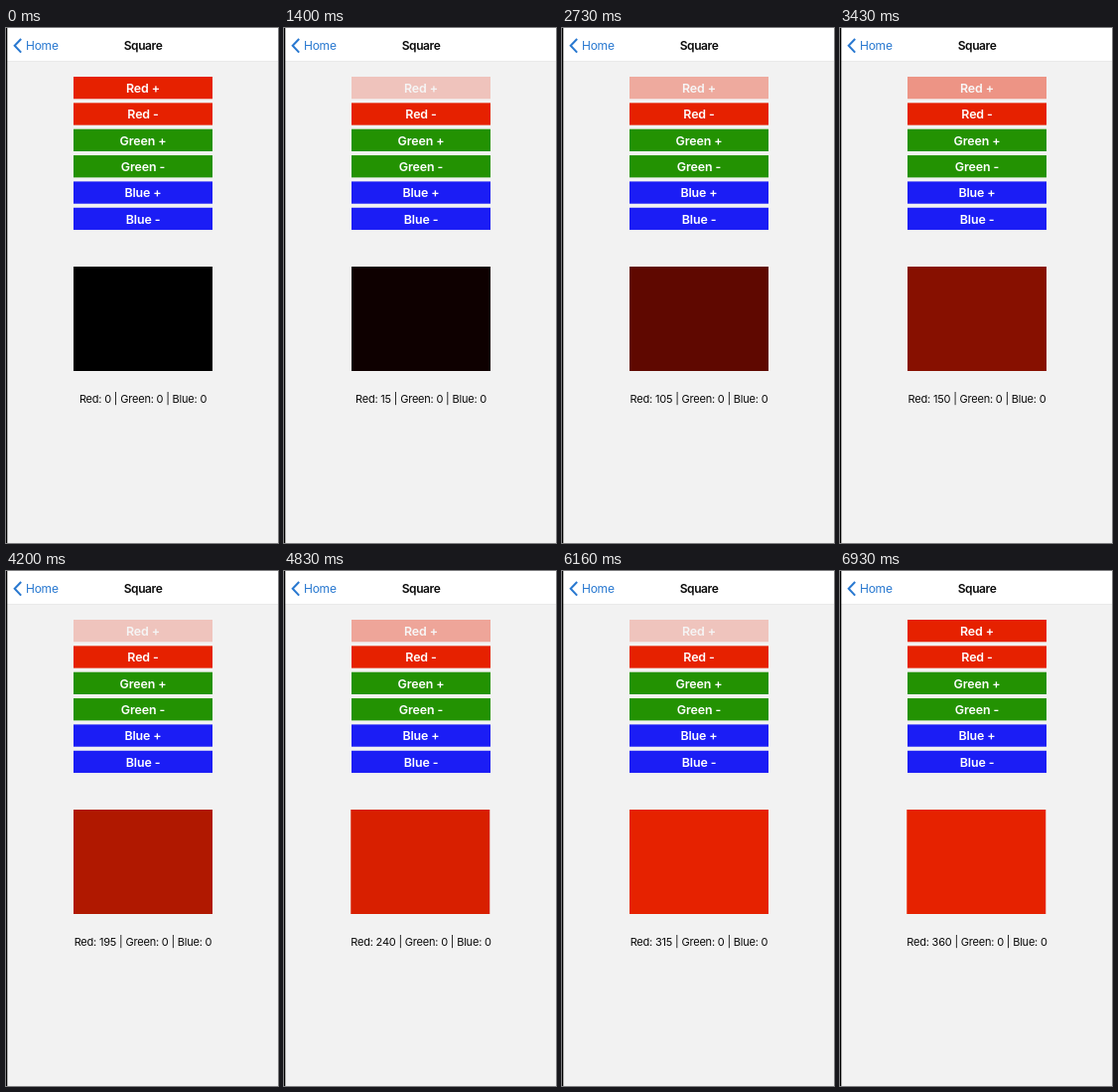
Recreate the animation shown at these times as an HTML page with a canvas. Size 274x518 px, loop 8000 ms.

```html
<!DOCTYPE html>
<html lang="en">
<head>
<meta charset="utf-8">
<title>Square</title>
<style>
  html, body { margin: 0; width: 100%; height: 100%; overflow: hidden; background: #f2f2f2; }
  canvas { display: block; }
</style>
</head>
<body>
<canvas id="stage" width="274" height="518"></canvas>
<script>
const ctx = document.getElementById('stage').getContext('2d');
const LOOP = 8000;
const FONT = 'Inter, "Open Sans", sans-serif';
const CENTER = 138;
const BG = [242, 242, 242];
const WHITE = [255, 255, 255];
const RED = [230, 33, 0];
const GREEN = [35, 146, 2];
const BLUE = [27, 29, 245];

const BUTTONS = [
  ['Red +', RED], ['Red -', RED],
  ['Green +', GREEN], ['Green -', GREEN],
  ['Blue +', BLUE], ['Blue -', BLUE]
];

// Tap rhythm as [tap number, release time]; taps between are evenly spaced.
const RHYTHM = [
  [1, 1390], [4, 2090], [7, 2660], [8, 2890], [9, 3100], [10, 3335],
  [13, 4060], [14, 4290], [19, 5450], [21, 5990], [24, 6650]
];
const FIRST_PRESS = 1170;
const PRESS_LEAD = 100;
const FADE_IN = 150;
const FADE_OUT = 250;
const DIM = 0.22;
const STEP = 15;

const releases = [];
RHYTHM.forEach(([n, time], i) => {
  if (i) {
    const [prevN, prevTime] = RHYTHM[i - 1];
    for (let k = prevN + 1; k < n; k++) {
      releases.push(prevTime + (time - prevTime) * (k - prevN) / (n - prevN));
    }
  }
  releases.push(time);
});

const clamp01 = v => Math.min(1, Math.max(0, v));
const ease = u => u < 0.5 ? 2 * u * u : 1 - 2 * (1 - u) * (1 - u);
const mix = (a, b, k) => a.map((v, i) => v + (b[i] - v) * k);
const rgb = c => `rgb(${c.map(Math.round).join(',')})`;

function buttonOpacity(t, taps) {
  if (!taps) return 1 - (1 - DIM) * ease(clamp01((t - FIRST_PRESS) / FADE_IN));
  if (taps < releases.length && t >= releases[taps] - PRESS_LEAD) return DIM;
  return DIM + (1 - DIM) * ease(clamp01((t - releases[taps - 1]) / FADE_OUT));
}

function setFont(size, weight, spacing) {
  ctx.font = `${weight} ${size}px ${FONT}`;
  ctx.letterSpacing = spacing + 'px';
}

function text(str, x, y, color, align = 'center') {
  ctx.textAlign = align;
  ctx.fillStyle = color;
  ctx.fillText(str, x, y);
}

function rect(x, y, w, h, color) {
  ctx.fillStyle = color;
  ctx.fillRect(x, y, w, h);
}

function drawHeader() {
  rect(0, 0, 274, 33, '#fff');
  rect(0, 33, 274, 0.5, '#dedede');
  ctx.strokeStyle = '#2878d0';
  ctx.lineWidth = 2;
  ctx.beginPath();
  ctx.moveTo(15.2, 11);
  ctx.lineTo(8.7, 17.8);
  ctx.lineTo(15.2, 24.6);
  ctx.stroke();
  setFont(12, 400, -0.25);
  text('Home', 20, 22, '#2878d0', 'left');
  setFont(12, 600, -0.4);
  text('Square', CENTER, 22, '#0a0a0a');
}

function drawButton([name, color], i, opacity) {
  const y = 49 + i * 26.35;
  rect(68, y, 140, 22.3, rgb(mix(BG, color, opacity)));
  setFont(12.4, 600, -0.1);
  text(name, CENTER, y + 15.8, rgb(mix(BG, WHITE, opacity)));
}

function squareColor(red) {
  const level = Math.min(red, 255) / 255;
  return rgb([230 * level, Math.max(0, 44 * level - 10), 0]);
}

function draw(t) {
  const taps = releases.filter(r => r <= t).length;
  const red = taps * STEP;
  rect(0, 0, 274, 518, rgb(BG));
  drawHeader();
  BUTTONS.forEach((b, i) => drawButton(b, i, i ? 1 : buttonOpacity(t, taps)));

  // The square shares its left edge with the caption once that is wider.
  const caption = `Red: ${red} | Green: 0 | Blue: 0`;
  setFont(11, 400, -0.2);
  const left = Math.min(68, CENTER - ctx.measureText(caption).width / 2);
  rect(left, 240, 140, 105, squareColor(red));
  text(caption, CENTER, 376.7, '#0a0a0a');

  rect(0, 0, 1.3, 518, '#000');
}

function tick(now) {
  draw(now % LOOP);
  requestAnimationFrame(tick);
}
draw(0);
requestAnimationFrame(tick);
</script>
</body>
</html>
```
